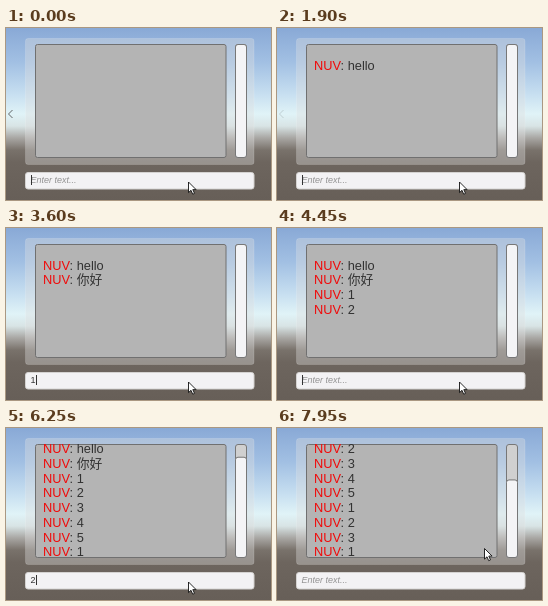
An HTML page that plays this animation: 265 by 172 pixels, repeating every 8 s.

```html
<!DOCTYPE html>
<html lang="en">
<head>
<meta charset="utf-8">
<title>Chat box</title>
<style>
  html, body { margin: 0; width: 100%; height: 100%; overflow: hidden; }
  svg { display: block; width: 100vw; height: 100vh; }
  text { font-family: "Liberation Sans", Arial, "Noto Sans CJK SC", "Noto Sans CJK", sans-serif; fill: #323232; white-space: pre; }
  #log text { font-size: 12.8px; }
  #log tspan { fill: #f00a0a; }
  .field { font-size: 9px; }
  #hint { font-style: italic; fill: #939393; }
</style>
</head>
<body>
<svg viewBox="0 0 265 172">
  <defs>
    <linearGradient id="sky" x2="0" y2="1">
      <stop offset="0" stop-color="#89a9d6"/>
      <stop offset=".2" stop-color="#a2c0e3"/>
      <stop offset=".38" stop-color="#c6def0"/>
      <stop offset=".5" stop-color="#e0f3f7"/>
      <stop offset=".57" stop-color="#d8e4e5"/>
      <stop offset=".64" stop-color="#a8a6a3"/>
      <stop offset=".71" stop-color="#79726b"/>
      <stop offset=".78" stop-color="#6d655e"/>
      <stop offset="1" stop-color="#675f58"/>
    </linearGradient>
    <clipPath id="view"><rect x="29" y="16" width="191" height="113.5"/></clipPath>
  </defs>
  <rect width="265" height="172" fill="url(#sky)"/>
  <path id="chevron" d="M6.5 82 L2.5 86 L6.5 90" fill="none" stroke="#444" stroke-width="1"/>
  <rect x="19.5" y="10.5" width="228.5" height="126" rx="2.5" fill="#dcdcdc" fill-opacity=".38" stroke="#fff" stroke-opacity=".14"/>
  <rect x="29.5" y="16.5" width="190.5" height="113" rx="2" fill="#b4b4b4" stroke="#707070"/>
  <rect x="229.5" y="16.5" width="11" height="113" rx="2.5" fill="#d0d0d0" stroke="#777"/>
  <rect id="thumb" x="229.5" width="11" rx="2.5" fill="#f4f4f6" stroke="#777"/>
  <g clip-path="url(#view)"><g id="log"></g></g>
  <rect x="19.5" y="144.5" width="228.5" height="16.5" rx="2.5" fill="#f3f2f4" stroke="#d5d3d1"/>
  <text id="hint" class="field" x="24.5" y="155.4">Enter text...</text>
  <text id="entry" class="field" x="24.5" y="155.4"></text>
  <rect id="caret" y="147" width="1" height="10" fill="#323232"/>
  <path id="mouse" d="M0 0V10.6L2.5 8.3L4.2 12.2L6 11.4L4.3 7.6H7.6Z" fill="#fff" stroke="#111" stroke-width=".9"/>
</svg>
<script>
const LOOP = 8000, BLINK = 590, LINE = 14.7, VIEW = 113;
const $ = id => document.getElementById(id);

// Input events: [time, field text], or [time, null] to send the field
const events = [[-490, ""]];
const type = (start, step, word) =>
  [...word].forEach((_, i) => events.push([start + i * step, word.slice(0, i + 1)]));
const send = time => events.push([time, null]);

type(750, 137, "hello"); send(1650);
type(2400, 100, "nihao"); events.push([3100, "你好"]); send(3250);
[
  ["1", 3600, 4000], ["2", 4250, 4400], ["3", 4600, 4800], ["4", 5000, 5200], ["5", 5400, 5500],
  ["1", 5750, 5950], ["2", 6250, 6450], ["3", 6600, 6800], ["1", 6950, 7100]
].forEach(([digit, typed, sent]) => { type(typed, 0, digit); send(sent); });

function addLine(message, i) {
  const line = document.createElementNS("http://www.w3.org/2000/svg", "text");
  const name = document.createElementNS("http://www.w3.org/2000/svg", "tspan");
  name.textContent = "NUV";
  line.append(name, ": " + message);
  line.setAttribute("x", 37);
  line.setAttribute("y", 41.5 + i * LINE);
  $("log").append(line);
}

const sentTimes = [];
let pending = "";
for (const [time, text] of events) {
  if (text === null) {
    addLine(pending, sentTimes.length);
    sentTimes.push(time);
  } else pending = text;
}
const lines = [...$("log").children];

const clamp = x => Math.min(1, Math.max(0, x));

function draw(t) {
  const [since, value] = events.filter(e => e[0] <= t).pop();
  const text = value || "";
  const count = sentTimes.filter(s => s <= t).length;

  lines.forEach((line, i) => line.setAttribute("visibility", i < count ? "visible" : "hidden"));
  const content = Math.max(VIEW, 129.1 + (count - 8) * LINE);
  $("log").setAttribute("transform", `translate(0 ${VIEW - content})`);
  const thumb = 102 * VIEW / content + 11;
  $("thumb").setAttribute("y", 16.5 + VIEW - thumb);
  $("thumb").setAttribute("height", thumb);

  const entry = $("entry");
  if (entry.textContent !== text) entry.textContent = text;
  $("hint").setAttribute("visibility", text ? "hidden" : "visible");
  const width = text ? entry.getComputedTextLength() : 0;
  $("caret").setAttribute("x", Math.round(24.6 + width));
  const lit = t < 7690 && Math.floor((t - since) / BLINK) % 2 === 0;
  $("caret").setAttribute("visibility", lit ? "visible" : "hidden");

  $("chevron").setAttribute("opacity", .8 * (1 - clamp((t - 1600) / 400)));
  const move = clamp((t - 7680) / 260), ease = move * move * (3 - 2 * move);
  $("mouse").setAttribute("transform", `translate(${182.5 + 25 * ease} ${154 - 33.5 * ease})`);
}

const start = performance.now();
function tick() {
  draw((performance.now() - start) % LOOP);
  requestAnimationFrame(tick);
}
tick();
</script>
</body>
</html>
```
